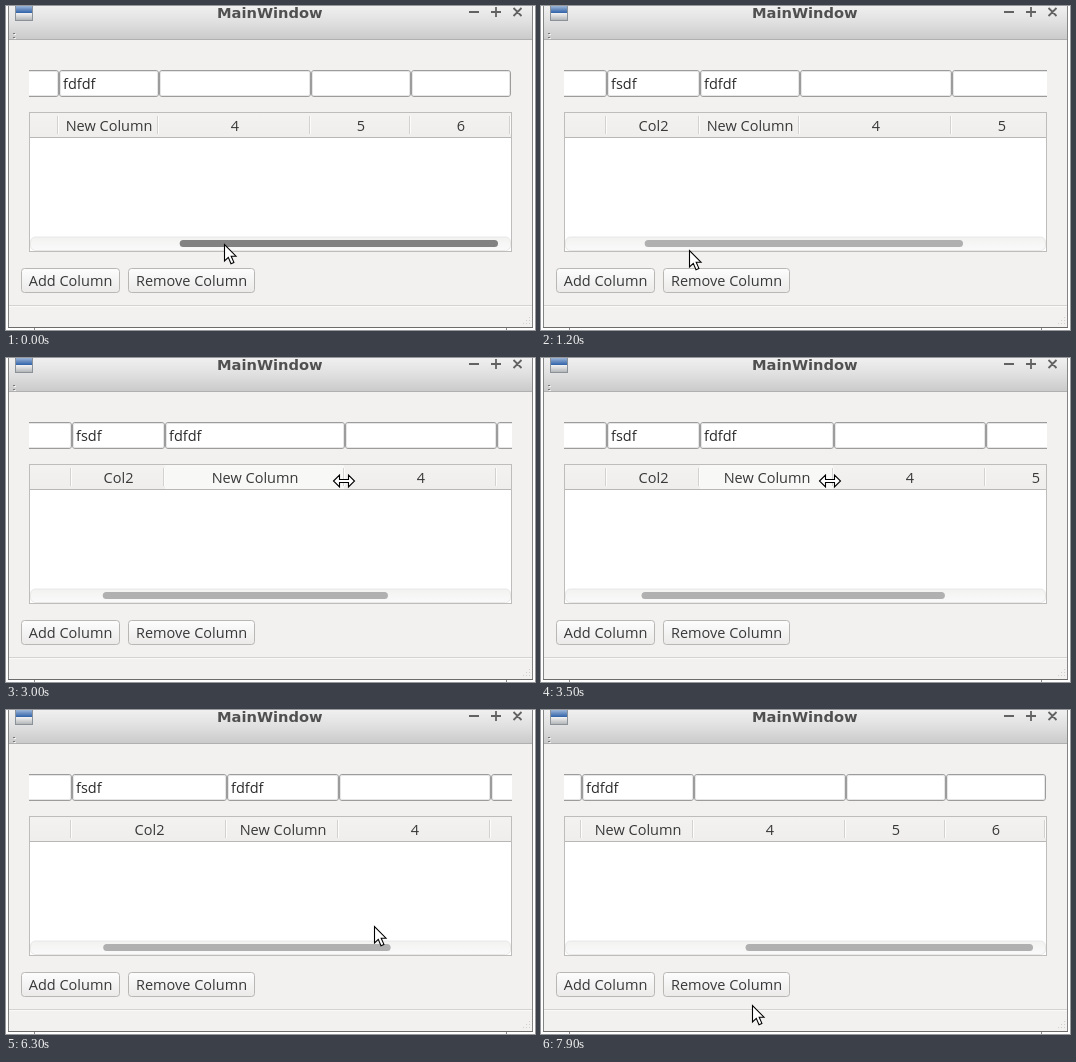
These frames come from a looping animation (529 by 324 pixels, 8000 ms). An HTML page:

```html
<!DOCTYPE html>
<html lang="en">
<head>
<meta charset="utf-8">
<title>MainWindow</title>
<style>
html, body { margin: 0; width: 100%; height: 100%; overflow: hidden; background: #fff; }
svg { display: block; width: 529px; height: 324px; }
text { font: 14.5px "Open Sans", "Noto Sans", sans-serif; fill: #383838; white-space: pre; }
.title { font: bold 14.67px "DejaVu Sans", sans-serif; fill: #505050; }
.mid { text-anchor: middle; }
.crisp { shape-rendering: crispEdges; }
.entry { fill: #fff; stroke: #9c9c9c; }
.inset { fill: none; stroke: #e6e6e6; }
.entry, .inset { shape-rendering: geometricPrecision; }
.cell text { fill: #2c2c2c; }
.button { fill: url(#btn); stroke: #b9b7b4; }
.pointer { fill: #fff; stroke: #000; stroke-width: 1.1; }
</style>
</head>
<body>
<svg viewBox="0 0 529 324" xmlns="http://www.w3.org/2000/svg">
  <defs>
    <linearGradient id="bar" x2="0" y2="1">
      <stop stop-color="#f0f0f0"/><stop offset=".5" stop-color="#dfdfdf"/><stop offset="1" stop-color="#c9c9c9"/>
    </linearGradient>
    <linearGradient id="btn" x2="0" y2="1"><stop stop-color="#fdfdfd"/><stop offset="1" stop-color="#ebeae9"/></linearGradient>
    <linearGradient id="head" x2="0" y2="1"><stop stop-color="#f3f2f1"/><stop offset="1" stop-color="#efeeed"/></linearGradient>
    <linearGradient id="groove" x2="0" y2="1"><stop stop-color="#f2f2f1"/><stop offset="1" stop-color="#fafafa"/></linearGradient>
    <linearGradient id="blue" x2="0" y2="1"><stop stop-color="#9db6d8"/><stop offset="1" stop-color="#2f62a8"/></linearGradient>
    <linearGradient id="pane" x2="0" y2="1"><stop stop-color="#f4f4f4"/><stop offset="1" stop-color="#b4b6b8"/></linearGradient>
    <clipPath id="rowClip"><rect x="23" y="60" width="483" height="34"/></clipPath>
    <clipPath id="headClip"><rect x="24" y="107" width="481" height="25"/></clipPath>
  </defs>

  <rect x="2" width="525" height="322" fill="#f2f1f0"/>
  <rect x="2" width="525" height="34" fill="url(#bar)"/>
  <g class="crisp">
    <rect x="2" y="33" width="525" height="1" fill="#b0b0b0"/>
    <rect x="2" width="1" height="322" fill="#858585"/>
    <rect x="526" width="1" height="322" fill="#858585"/>
    <rect x="2" y="321" width="525" height="1" fill="#6c6c6c"/>
    <path d="M28 322h1v2h-1zM500 322h1v2h-1z" fill="#8a8a8a"/>
    <path d="M7 27h2v1h-2zM7 31h2v1h-2z" fill="#777"/>
    <path d="M8 28h2v1h-2zM8 32h2v1h-2z" fill="#f4f4f4"/>
    <rect x="3" y="299" width="523" height="1" fill="#d5d3d1"/>
    <rect x="3" y="300" width="523" height="1" fill="#f9f9f8"/>
    <path d="M523 311h1v1h-1zM520 314h1v1h-1zM523 314h1v1h-1zM517 317h1v1h-1zM520 317h1v1h-1zM523 317h1v1h-1z" fill="#d2d0ce"/>
    <rect x="9" width="18" height="15" fill="#8c9299"/>
    <rect x="10" width="16" height="7" fill="url(#blue)"/>
    <rect x="10" y="7" width="16" height="7" fill="url(#pane)"/>
  </g>
  <text class="title mid" x="263.800" y="12">MainWindow</text>
  <path d="M463 6h10M485 6h10M490 1v10M507.500 2l8 8M515.500 2l-8 8" fill="none" stroke="#626262" stroke-width="1.800"/>

  <g id="row" clip-path="url(#rowClip)"></g>

  <rect class="crisp" x="23.500" y="106.500" width="482" height="139" fill="#fff" stroke="#bfbdbb"/>
  <rect x="24" y="107" width="481" height="24" fill="url(#head)"/>
  <rect class="crisp" x="24" y="131" width="481" height="1" fill="#b9b7b5"/>
  <g id="header" clip-path="url(#headClip)"></g>
  <rect x="24.500" y="231" width="480" height="13.500" rx="5" fill="url(#groove)" stroke="#e9e8e7"/>
  <rect id="thumb" y="234" height="7" rx="3.500"/>

  <rect class="button" x="15.500" y="262.500" width="98" height="24" rx="3"/>
  <rect class="button" x="122.500" y="262.500" width="126" height="24" rx="3"/>
  <text class="mid" x="64.500" y="280">Add Column</text>
  <text class="mid" x="185.500" y="280">Remove Column</text>

  <path id="arrow" class="pointer" d="M-.5 .5V17L3.300 13.400L6 19.700L8.900 18.400L6.200 12.200H11Z"/>
  <path id="sizer" class="pointer" d="M-10.500 0L-4.500-6V-1.500H4.500V-6L10.500 0L4.500 6V1.500H-4.500V6Z"/>
</svg>
<script>
const LOOP = 8000, STEP = 100, LEFT = 23, VIEW = 482, GROOVE = 455;
const DARK = "#828282", LIGHT = "#b0b0b0";
const $ = id => document.getElementById(id);

function set(el, attrs) {
  for (const k in attrs) el.setAttribute(k, attrs[k]);
}
function add(parent, tag, attrs, label) {
  const el = document.createElementNS("http://www.w3.org/2000/svg", tag);
  set(el, attrs);
  if (label) el.textContent = label;
  return parent.appendChild(el);
}

const initial = { x: 219, y: 238, scroll: 207, col2: 93, col3: 100, cursor: "arrow", hover: "", thumb: DARK };

// Each action eases numbers from one time to another; words switch at its end.
const actions = [
  [0, 600, { x: 147, y: 243, scroll: 98 }],
  [800, 900, { x: 138, scroll: 85 }],
  [1000, 1100, { x: 149, y: 244, scroll: 101 }],
  [1100, 1200, { thumb: LIGHT }],
  [1200, 2100, { x: 254, y: 122 }],
  [1200, 1900, { hover: "New Column" }],
  [2300, 2500, { x: 258, y: 123, cursor: "sizer" }],
  [2800, 3100, { x: 348, col3: 190 }],
  [3200, 3840, { x: 266, col3: 112 }],
  [3800, 3900, { cursor: "arrow" }],
  [3840, 4200, { x: 157, cursor: "sizer" }],
  [4200, 4300, { x: 154, cursor: "arrow" }],
  [4700, 4800, { x: 162, y: 126 }],
  [5000, 5200, { x: 161, y: 123, cursor: "sizer" }],
  [5400, 5500, { hover: "" }],
  [5400, 5700, { x: 223, y: 126, col2: 155 }],
  [5800, 5900, { cursor: "arrow" }],
  [5800, 6000, { x: 321, y: 201 }],
  [6200, 6800, { x: 478, y: 251 }],
  [6900, 7100, { x: 441, y: 242 }],
  [7200, 7300, { scroll: 281 }],
  [7300, 7400, { thumb: DARK }],
  [7500, 7600, { thumb: LIGHT }],
  [7500, 7900, { x: 212, y: 295 }]
];

const easeOut = p => 1 - (1 - p) ** 2;

function stateAt(t) {
  const s = { ...initial };
  for (const [from, to, goal] of actions) {
    if (t <= from) continue;
    const p = easeOut(Math.min(1, (t - from) / (to - from)));
    for (const k in goal) {
      if (typeof goal[k] === "number") s[k] = Math.round(s[k] + (goal[k] - s[k]) * p);
      else if (t >= to) s[k] = goal[k];
    }
  }
  return s;
}

const columns = [["Col1"], ["Col2", "fsdf"], ["New Column", "fdfdf"], ["4"], ["5"], ["6"]].map(([name, value]) => {
  const cell = add($("row"), "g", { class: "cell" }), head = add($("header"), "g", {});
  const rule = fill => add(head, "rect", { class: "crisp", y: 110, width: 1, height: 18, fill });
  return {
    name, cell, head,
    entry: add(cell, "rect", { class: "entry", x: .5, y: 64.5, height: 26, rx: 2.5 }),
    inset: add(cell, "rect", { class: "inset", x: 1.5, y: 65.5, height: 24, rx: 1.5 }),
    value: add(cell, "text", { x: 4, y: 83 }, value),
    glow: add(head, "rect", { y: 107, height: 24, fill: "#f8f8f7" }),
    line: rule("#d4d2d0"),
    shine: rule("#fcfcfc"),
    label: add(head, "text", { class: "mid", y: 125 }, name)
  };
});

const show = (el, on) => set(el, { visibility: on ? "visible" : "hidden" });

function draw(time) {
  const s = stateAt(Math.floor(time / STEP) * STEP);
  const widths = [144, s.col2, s.col3, 152, 100, 100];
  const ratio = GROOVE / widths.reduce((a, b) => a + b);
  let x = LEFT - s.scroll;

  columns.forEach((c, i) => {
    const w = widths[i], transform = `translate(${x} 0)`;
    set(c.cell, { transform });
    set(c.head, { transform });
    set(c.entry, { width: w - 1 });
    set(c.inset, { width: w - 3 });
    set(c.glow, { width: w - 1 });
    show(c.glow, c.name === s.hover);
    set(c.line, { x: w - 2 });
    set(c.shine, { x: w - 1 });
    set(c.label, { x: w / 2 });
    x += w;
  });

  set($("thumb"), { x: 37 + s.scroll * ratio, width: VIEW * ratio, fill: s.thumb });
  for (const id of ["arrow", "sizer"]) {
    set($(id), { transform: `translate(${s.x} ${s.y})` });
    show($(id), s.cursor === id);
  }
}

const start = performance.now();
function tick() {
  draw((performance.now() - start) % LOOP);
  requestAnimationFrame(tick);
}
tick();
</script>
</body>
</html>
```
